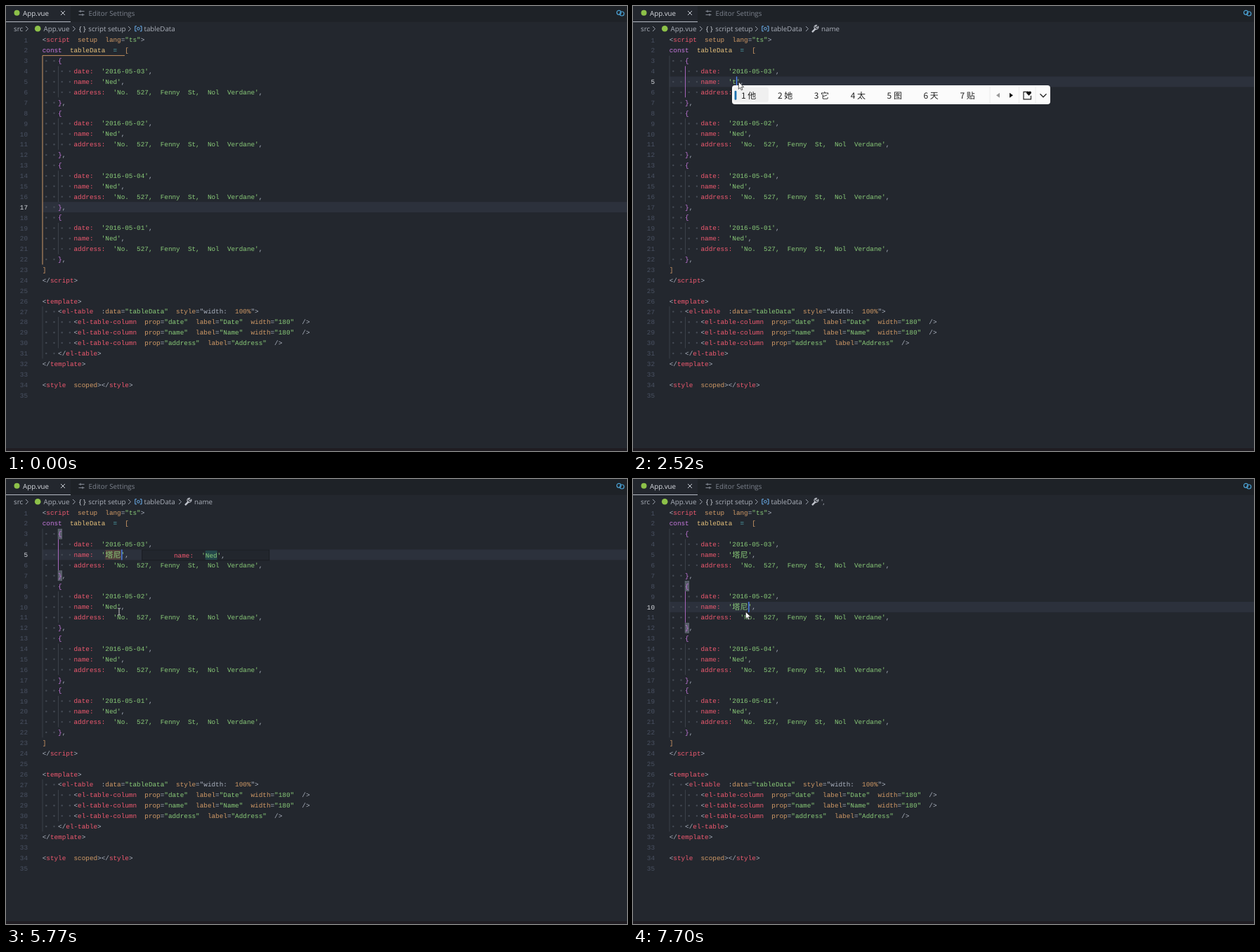
Recreate the animation shown at these times as an HTML page. Size 884 by 634 pixels, loop 8 s.

```html
<!DOCTYPE html>
<html lang="en">
<head>
<meta charset="utf-8">
<title>Editor</title>
<style>
html, body { margin: 0; width: 100%; height: 100%; overflow: hidden; background: #23272e; }
svg { display: block; width: 100vw; height: 100vh; text-rendering: geometricPrecision; }
.code { font: 9.33px "Liberation Mono", monospace; white-space: pre; }
.cjk { font: 11.2px "Noto Sans CJK SC", "Noto Sans CJK", sans-serif; }
.ui { font: 9.75px "Open Sans", "Noto Sans", sans-serif; }
.ime { font: 12px "Noto Sans CJK SC", "Noto Sans CJK", sans-serif; }
</style>
</head>
<body>
<svg id="stage" viewBox="0 0 884 634"></svg>
<script>
const LOOP = 8000, CELL = 5.6, LEFT = 51.7, LINE = 14.885;
const NAME = 'Ned', LOCAL = '塔尼', NAME_X = LEFT + 16 * CELL;
const COLORS = {
  r: '#ef596f', g: '#89ca78', p: '#c678dd', o: '#d19a66',
  y: '#e5c07b', w: '#abb2bf', c: '#56b6c2'
};
const mid = row => 48.4 + (row - 1) * LINE;
const rowTop = row => mid(row) - LINE / 2;
const esc = s => s.replace(/&/g, '&amp;').replace(/</g, '&lt;');
const rect = (x, y, w, h, fill, more = '') =>
  `<rect x="${x}" y="${y}" width="${w}" height="${h}" fill="${fill}" ${more}/>`;
const dot = (x, y, r, fill, more = '') =>
  `<circle cx="${x}" cy="${y}" r="${r}" fill="${fill}" ${more}/>`;
const line = (d, color, width = 1) =>
  `<path d="${d}" fill="none" stroke="${color}" stroke-width="${width}"/>`;
const text = (cls, x, y, s, fill, more = '') =>
  `<text class="${cls}" x="${x}" y="${y}" fill="${fill}" ${more}>${esc(s)}</text>`;

// Source lines: segments split by "|", each led by its colour key.
const nameLine = s => `    rname:|g '${s}'|w,`;
const entry = (day, name) => [
  '  p{', `    rdate:|g '2016-05-0${day}'|w,`, nameLine(name),
  "    raddress:|g 'No. 527, Fenny St, Nol Verdane'|w,", '  p}|w,'
];
const column = (prop, label, width) =>
  `    w<|rel-table-column|o prop|w=|g"${prop}"|o label|w=|g"${label}"` +
  (width ? `|o width|w=|g"${width}"` : '') + '|w />';
const source = (first, second) => [
  'w<|rscript|o setup|o lang|w=|g"ts"|w>',
  'pconst|y tableData|c =|o [',
  ...entry(3, first), ...entry(2, second), ...entry(4, NAME), ...entry(1, NAME),
  'o]', 'w</|rscript|w>', '',
  'w<|rtemplate|w>',
  '  w<|rel-table|w :|odata|w=|g"tableData"|o style|w="width:|o 100%|w">',
  column('date', 'Date', 180), column('name', 'Name', 180), column('address', 'Address'),
  '  w</|rel-table|w>', 'w</|rtemplate|w>', '',
  'w<|rstyle|o scoped|w></|rstyle|w>', ''
];

// A space and a wide character both take two cells.
function code(src, x, y) {
  let out = '';
  x += src.search(/\S|$/) * 2 * CELL;
  for (const seg of src.trim().split('|')) {
    for (const part of seg.slice(1).match(/ +|[\u4e00-\u9fff]+|[^ \u4e00-\u9fff]+/g) || []) {
      const wide = part > '\u4e00', blank = part[0] === ' ';
      if (!blank) out += text(wide ? 'cjk' : 'code', x, y + (wide ? 4 : 3), part, COLORS[seg[0]]);
      x += part.length * CELL * (wide || blank ? 2 : 1);
    }
  }
  return out;
}

function header(label) {
  const chevron = x => line(`M${x - 2} 29l3.5 3.5-3.5 3.5`, '#9da3ae');
  const crumb = '#abb0ba';
  let s = rect(0, 0, 884, 22.6, '#1e2227') + rect(0, 0, 92, 22.6, '#23272e') +
    rect(0, 22, 92, 1, '#b4b9c2') + dot(15.5, 9.8, 4, '#8dc149') +
    text('ui', 24, 13.7, 'App.vue', '#d7dae0') + line('M78 7l6 6M84 7l-6 6', '#c8ccd4') +
    line('M103.5 7.5h8M103.5 12.5h8M106 5.8v3.4M109 10.8v3.4', '#858b96') +
    text('ui', 117.5, 13.7, 'Editor Settings', '#7d838e', 'font-style="italic"') +
    dot(872.5, 9.3, 3, 'none', 'stroke="#4a9fd0" stroke-width="1.2"') +
    dot(876.8, 11, 3, 'none', 'stroke="#4a9fd0" stroke-width="1.2"');
  s += text('ui', 11, 36.3, 'src', crumb) + dot(45.2, 32.3, 4.3, '#8dc149') +
    text('ui', 53.5, 36.3, 'App.vue', crumb) +
    text('ui', 103.7, 36.3, '{ }', '#d0d4da') + text('ui', 117.3, 36.3, 'script setup', crumb) +
    line('M186 28.8h-2.2v7h2.2M190.8 28.8h2.2v7h-2.2', '#6db3f2') +
    dot(188.4, 32.3, 1.8, 'none', 'stroke="#6db3f2"') +
    text('ui', 196.5, 36.3, 'tableData', crumb) + [30, 97, 176].map(chevron).join('');
  if (label) {
    s += chevron(248) + line('M255 37.2l5-5', '#c0c4cc', 2.4) +
      line('M263.8 29.3a3 3 0 1 1-2.3-2l-1.7 2 1.8 1.8z', '#c0c4cc', 1.1) +
      text('ui', 268, 36.3, label, crumb);
  }
  return s;
}

function guides(active) {
  const v = (x, a, b, color) => line(`M${x} ${rowTop(a)}V${rowTop(b + 1)}`, color);
  let s = v(52, 3, 22, '#3b4049') + v(52, 27, 31, '#3b4049') + v(74.5, 28, 30, '#3b4049');
  for (const r of [5, 10, 15, 20]) s += v(74.5, r - 1, r + 1, '#3b4049');
  return s + (active === 17
    ? line(`M169 70.6H52V${rowTop(23)}`, '#c08d5c')
    : v(74.5, active - 1, active + 1, '#a765ba'));
}

function imePanel(row, words) {
  const y = rowTop(row) + 12.6, c = y + 14.2, pitch = words[0].length > 1 ? 62 : 51.9;
  let s = rect(141, y, 453, 26.8, '#fbfbfb', 'rx="4"') +
    rect(143, y + 3, pitch - 2, 21, '#f0f0f0', 'rx="3"') +
    rect(144.6, c - 6.5, 2.8, 13, '#1c6fae', 'rx="1.2"');
  words.forEach((w, i) => {
    const x = 154 + i * pitch;
    s += text('ime', x, c + 4.4, String(i + 1), '#222') + text('ime', x + 9.3, c + 4.4, w, '#222');
  });
  return s + line(`M508 ${y + 1}v24.8M549.5 ${y + 1}v24.8M573 ${y + 1}v24.8`, '#ececec') +
    `<path d="M522 ${c - 3.5}v7l-5-3.5z" fill="#999"/>` +
    `<path d="M536 ${c - 3.5}v7l5-3.5z" fill="#111"/>` +
    line(`M561 ${c - 5}h-5v10.5h10.5v-5`, '#222', 1.2) +
    `<path d="M563.5 ${c + .5}l-3.4-3.6a2 2 0 0 1 3.4-2 2 2 0 0 1 3.4 2z" fill="#111"/>` +
    line(`M579.5 ${c - 2}l4.5 4.5 4.5-4.5`, '#222', 1.2);
}

function ghost(row, name) {
  const wide = name === LOCAL, x = wide ? 188.4 : 194.2, y = rowTop(row) + .6;
  return rect(x - .5, y, wide ? 169.5 : 181, 14.6, '#22262d', 'stroke="#1a1d22"') +
    rect(x + 16 * CELL, y + .8, wide ? 22.4 : 16.8, 13.2, '#24474a') +
    code(nameLine(name), x, mid(row) + .8);
}

function pointer(t) {
  if (t < 600) return '';
  let x = 151, y = 108;
  if (t < 1400) {
    const p = Math.floor((t - 600) / 50) / 16, left = (1 - p) ** 2;
    x += 696 * left;
    y += 514 * left;
  } else if (t >= 5420) {
    const p = Math.min(1, (Math.floor((t - 5420) / 58.3) + 1) / 7);
    x += 10 * p + 10 * Math.sin(Math.PI * p);
    y += 81 * p;
  }
  const within = (a, b) => t >= a && t < b;
  let s = '';
  if (within(1550, 1710) || within(1760, 1860) || within(5980, 6140) || within(6240, 6340))
    s += dot(x - .5, y, 9.5, '#d0c808', 'opacity=".78"');
  if (within(2520, 4140) || t >= 7000)
    return s + `<path d="M${x - .7} ${y}v10.4l2.4-2.2 1.6 3.6 1.7-.8-1.6-3.5h3.3z" fill="#fff" stroke="#111" stroke-width=".7"/>`;
  return s + line(`M${x - 2} ${y - 4.8}h1.4l.6.6.6-.6h1.4M${x} ${y - 4.2}v8.4M${x - 2} ${y + 4.8}h1.4l.6-.6.6.6h1.4`, '#dcdcdc', .9);
}

function draw(t) {
  const within = (a, b) => t >= a && t < b;
  const later = t >= 6090;
  const row = t < 1660 ? 17 : later ? 10 : 5;
  const [select, type, second, commit, settle] =
    later ? [6240, 7000, 7250, 7650, 7700] : [1760, 2520, 2870, 3380, 3440];
  const selected = within(select, type), composing = within(type, commit), done = t >= commit;
  const typed = t < type ? NAME : t < second ? 't' : t < commit ? 'tn' : LOCAL;
  const suggest = within(3790, 6090), suggestLocal = within(6440, 7000);
  const label = t < 1660 ? '' : within(3230, 3740) || t >= 7600 ? "'," : 'name';
  const lines = source(later ? LOCAL : typed, later ? typed : NAME);

  let s = rect(0, 0, 884, 634, '#23272e');
  if (!selected) s += rect(LEFT, rowTop(row), 884, LINE, '#2c313c');
  s += rect(0, 630, 884, 4, '#1f1c22') + guides(row);

  if (selected) {
    s += rect(NAME_X, rowTop(row), 16.8, LINE, suggestLocal ? '#5d525d' : '#4a5161');
    for (const r of [10, 15, 20]) if (r > row)
      s += rect(NAME_X, rowTop(r) + .6, 17, 13.6, '#5b5330', 'stroke="#c9c193"');
  }
  if (suggest) s += rect(NAME_X, rowTop(5) + .5, 22.4, 14, '#51403c');
  if (done && row !== 17) for (const r of [row - 2, row + 2])
    s += rect(LEFT + 4 * CELL, rowTop(r) + .5, CELL, 14, '#555b67', 'stroke="#6d737e" stroke-width=".6"');

  lines.forEach((src, i) => {
    const n = i + 1, y = mid(n);
    s += text('code', 31, y + 3.2, String(n), n === row ? '#d7dae0' : '#495162', 'text-anchor="end"');
    for (let k = src.search(/\S|$/); k-- > 0;) s += dot(LEFT + (2 * k + 1) * CELL, y, 1.2, '#444a54');
    s += code(src, LEFT, y);
  });

  if (suggest) s += ghost(5, NAME);
  if (suggestLocal) s += ghost(10, LOCAL);

  const hidden = within(2260, 2520) || within(3990, 4400) || within(4960, 5420) || within(6840, 7000);
  if (row !== 17 && !hidden) {
    const x = selected ? 158.6 : composing ? NAME_X + typed.length * CELL
      : !done ? 152.5 : t < settle ? 161.5 : 164.2;
    s += rect(x, rowTop(row), 1.3, LINE, '#528bff');
  }
  if (composing) s += imePanel(row, t < second
    ? [...'他她它太图天贴']
    : [LOCAL, '同年', '体内', '天哪', '童年', '团内']);
  return s + header(label) + pointer(t);
}

const stage = document.getElementById('stage');
let start, shown;
function tick(now) {
  start ??= now;
  const next = draw((now - start) % LOOP);
  if (next !== shown) stage.innerHTML = shown = next;
  requestAnimationFrame(tick);
}
stage.innerHTML = shown = draw(0);
requestAnimationFrame(tick);
</script>
</body>
</html>
```
